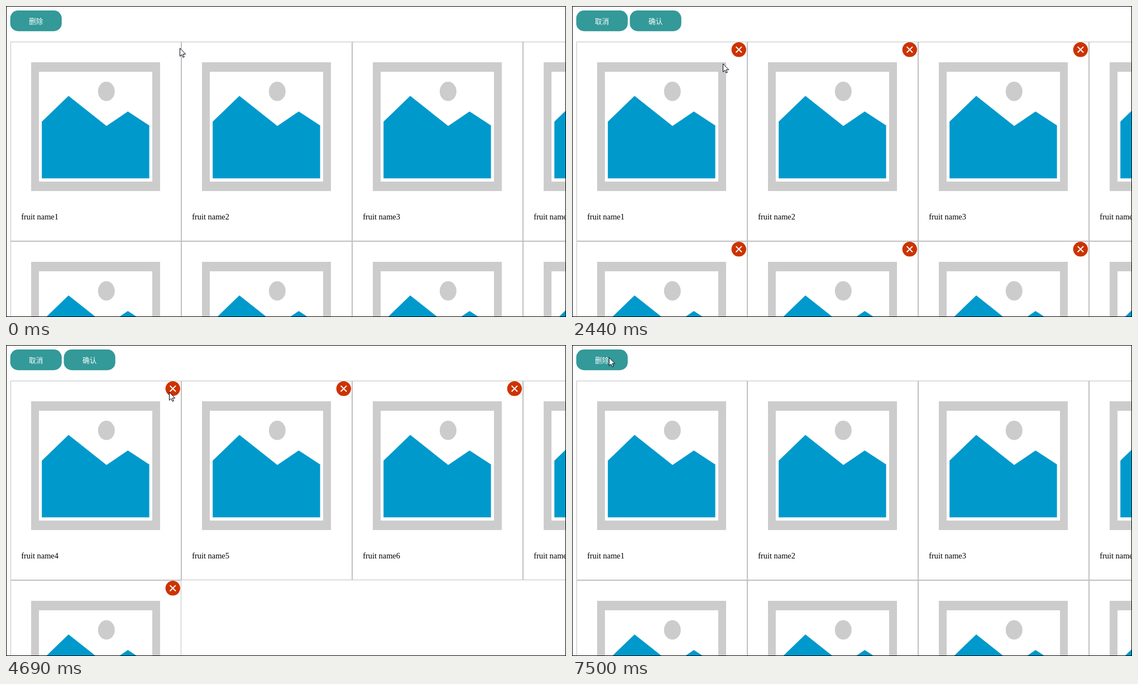
Animation, 1003 px wide and 558 px high, one loop 8000 ms. Source, as an HTML page:

```html
<!DOCTYPE html>
<html lang="zh-CN">
<head>
<meta charset="utf-8">
<title>Fruit list</title>
<style>
  html, body { margin: 0; width: 100%; height: 100%; overflow: hidden; background: #fff; }
  svg { display: block; width: 1003px; height: 558px; }
  .btn rect { fill: #399; }
  .btn text { fill: #fff; font: 500 12.6px "Noto Sans CJK SC", "Noto Sans CJK", sans-serif; text-anchor: middle; }
  .label { font: 14.4px "Liberation Serif", "Times New Roman", serif; }
</style>
</head>
<body>
<svg viewBox="0 0 1003 558">
  <defs>
    <g id="card">
      <rect x=".5" y=".5" width="305" height="357" fill="none" stroke="#c0c0c0"/>
      <rect x="44" y="45.5" width="217" height="214" transform="translate(0 0)" fill="none"/>
      <path d="M37 37H268V268H37ZM51 54V251H254V54Z" fill="#ccc"/>
      <ellipse cx="171.8" cy="89.2" rx="15" ry="17.4" fill="#ccc"/>
      <path d="M56.2 143.5L104 97.2L172 151.2L210.3 125.2L248.6 150.3V245.3H56.2Z" fill="#09c"/>
    </g>
    <g id="cross">
      <circle cx="290.8" cy="14.3" r="13.2" fill="#c30"/>
      <path d="M285.6 9.1l10.4 10.4m0-10.4l-10.4 10.4" stroke="#fff" stroke-width="2"/>
    </g>
  </defs>
  <g class="btn">
    <rect x="7.6" y="8.1" width="92.2" height="37.1" rx="14"/>
    <text id="first" x="53.7" y="32">删除</text>
  </g>
  <g class="btn" id="confirm">
    <rect x="103.6" y="8.1" width="92.2" height="37.1" rx="14"/>
    <text x="149.7" y="32">确认</text>
  </g>
  <g id="list"></g>
  <path id="cursor" d="M.5 .7V15.2L3.8 12.1L6.1 17.2L8.3 16.3L6.1 11.3H10.7Z" fill="#fff" stroke="#001"/>
  <rect x=".5" y=".5" width="1002" height="557" fill="none" stroke="#000"/>
</svg>
<script>
  const LOOP = 8000, TOTAL = 8, COLS = 4, CELL_W = 306, CELL_H = 358;
  const EDIT_ON = 1010, EDIT_OFF = 7130;
  const REMOVALS = [2870, 3940, 4690];

  // The pointer glides to each stop in a few hops and rests there.
  const GLIDE = 190, HOPS = 5;
  const stop = (arrive, x, y) => ({ arrive, x, y });
  const STOPS = [
    stop(0, 311, 75),
    stop(630, 79, 36),
    stop(1010, 72, 32),
    stop(1580, 247, 108),
    stop(2050, 270, 103),
    stop(2640, 292, 84),
    stop(6070, 75, 24),
    stop(6880, 66, 22)
  ];

  const $ = id => document.getElementById(id);
  const show = (el, on) => el.setAttribute('visibility', on ? 'visible' : 'hidden');

  function makeCell(i) {
    const x = 8 + CELL_W * (i % COLS), y = 64 + CELL_H * Math.floor(i / COLS);
    $('list').insertAdjacentHTML('beforeend',
      `<g transform="translate(${x} ${y})"><use href="#card"/><use href="#cross"/>
       <text class="label" x="19.2" y="319"></text></g>`);
    const box = $('list').lastElementChild;
    return { box, cross: box.children[1], label: box.children[2] };
  }
  const cells = Array.from({ length: TOTAL }, (_, i) => makeCell(i));

  function cursorAt(t) {
    const next = STOPS.findLastIndex(s => t >= s.arrive - GLIDE);
    const to = STOPS[next], from = STOPS[Math.max(0, next - 1)];
    const progress = 1 + (t - to.arrive) / GLIDE;
    const k = Math.min(1, (Math.floor(progress * (HOPS - 1)) + 1) / HOPS);
    const mix = axis => Math.round(from[axis] + (to[axis] - from[axis]) * k);
    return [mix('x'), mix('y')];
  }

  function render(t) {
    const editing = t >= EDIT_ON && t < EDIT_OFF;
    const removed = editing ? REMOVALS.filter(r => t >= r).length : 0;
    $('first').textContent = editing ? '取消' : '删除';
    show($('confirm'), editing);
    cells.forEach(({ box, cross, label }, i) => {
      const present = i < TOTAL - removed;
      show(box, present);
      show(cross, present && editing);
      label.textContent = 'fruit name' + (i + 1 + removed);
    });
    $('cursor').setAttribute('transform', `translate(${cursorAt(t)})`);
  }

  const began = performance.now();
  function frame() {
    render((performance.now() - began) % LOOP);
    requestAnimationFrame(frame);
  }
  frame();
</script>
</body>
</html>
```
